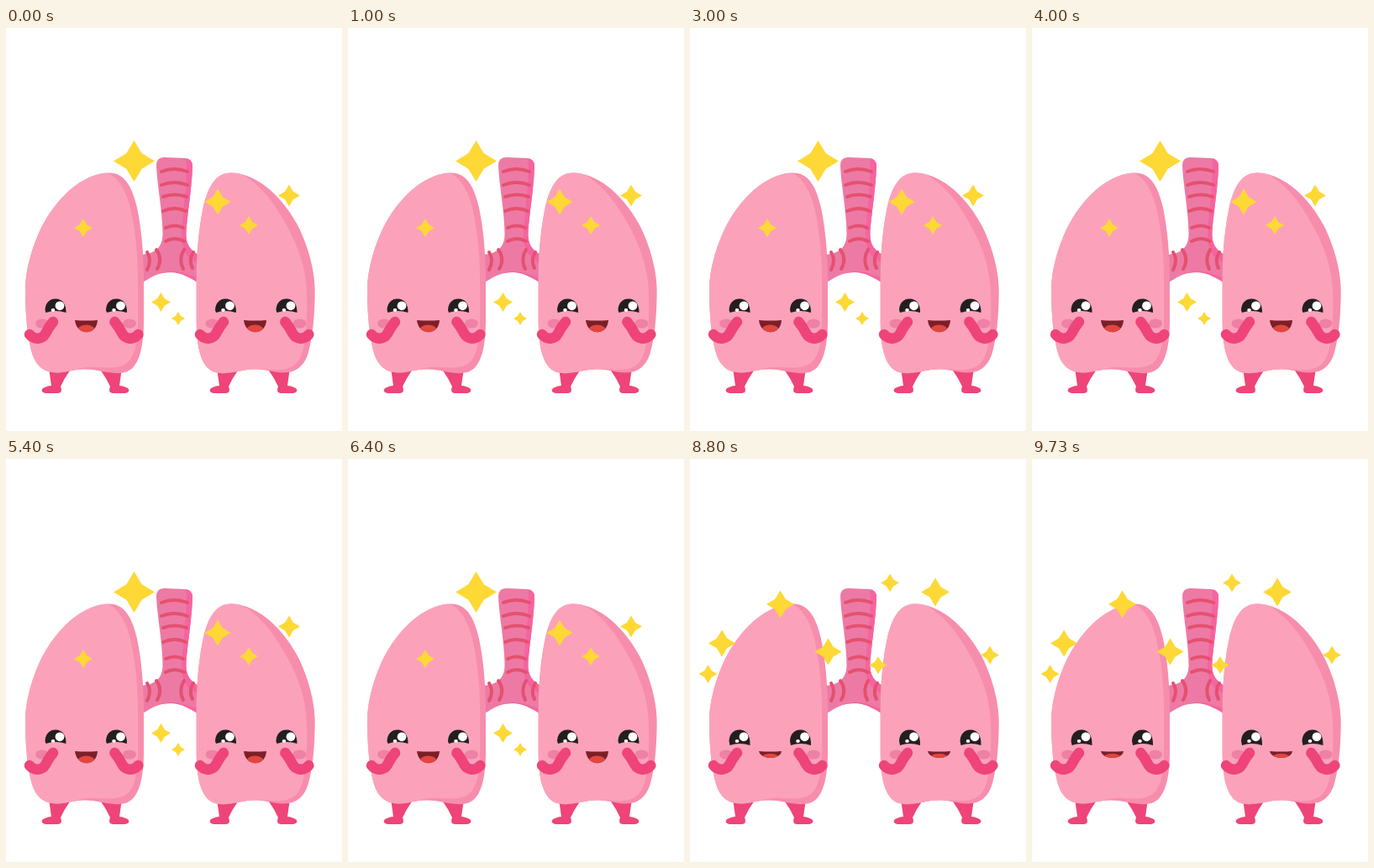
Write an HTML page with a canvas that moves like this. It is 400x480 px and loops after 9.99 s.

```html
<!DOCTYPE html>
<html lang="en">
<head>
<meta charset="utf-8">
<title>Happy lungs</title>
<style>
  html, body { margin: 0; width: 100%; height: 100%; overflow: hidden; background: #fff; }
  canvas { display: block; width: 400px; height: 480px; }
</style>
</head>
<body>
<canvas id="stage"></canvas>
<script>
const canvas = document.getElementById('stage');
const ctx = canvas.getContext('2d');
const ratio = window.devicePixelRatio || 1;
canvas.width = 400 * ratio;
canvas.height = 480 * ratio;

const LOOP = 9990, BEAT = 1000, SWITCH = 530;
const COLOR = {
  lung: '#fba2ba', lungShade: '#f78dac', limb: '#ee4479', cheek: '#ee81a5',
  tube: '#ec7aa5', tubeShade: '#f5649f', ring: '#e5506f',
  star: '#fed835', eye: '#231f20', mouth: '#7b1f29', tongue: '#e2463f'
};

// Each star: centre x, centre y, radius
const STARS_OPEN = [
  [152.5, 158.5, 24.5], [252, 207, 15.5], [337, 199.5, 13], [289, 235, 11],
  [92, 238, 11], [184.5, 326.5, 11.5], [205, 346, 8]
];
const STARS_CLOSED = [
  [107.5, 173, 16.5], [38, 219.5, 16], [21.5, 256, 11], [164.5, 229.5, 16],
  [238, 147.5, 11], [292, 158.5, 17], [357, 233.5, 11], [224, 245.5, 10.5]
];

const lungPath = new Path2D(`M123 172.5 C140 172.5 150 187 156 214 C161 238 164 268 164 300
  L164 350 C164 375 160 393 153 402 C148 409 140 412 129 411
  C116 410 108 406.5 94 406.5 C80 406.5 74 410 61 410.5
  C45 411 36 402 31.5 389 C26 371 23 345 23 312 C23 286 33 255 44 234
  C66 194 97 172.5 123 172.5 Z`);
const innerLight = new Path2D(`M113 170 C131 173 142 190 148 214 C154 240 157 270 157 300
  L157 350 C157 374 153 390 145 398 C137 405 125 405 108 404 C94 403 84 406 73 412
  L20 415 L10 300 L30 160 Z`);
const outerLight = new Path2D(`M260 165 C285 173 304 188 322 215 C340 243 357 275 358 316
  C359 350 357 380 350 393 C344 405 332 408 318 407 C304 406 297 406 288 407
  L278 415 L220 415 L220 165 Z`);
const tubePath = new Path2D(`M179 164 Q179 154 188 154 L213 155 Q223 156 222 166
  C221 192 216 222 214.5 242 C213.5 257 219 266 232 271 L232 305
  C219 298 210 291 196 291 C181 291 172 297 160 305 L160 270
  C178 269 187 261 186.5 244 C186 216 180 188 179 164 Z`);
const tubeSide = new Path2D(`M214 150 C217 180 210 220 209 245 C209 264 215 277 235 281
  L235 312 L218 298 C205 290 190 291 180 294 C199 285 212 292 226 297
  L230 268 L226 150 Z`);
const tubeRings = new Path2D(`M185 171 Q200 165 216 171 M185 187 Q200 181 216 187
  M187 201 Q201 196 215 201 M187 218 Q201 212 214 218
  M190 238 Q201 233 211 238 M190 254 Q201 248 212 254
  M168 267 Q174 277 168 288 M179 264 Q187 275 180 287
  M212 264 Q205 275 211 287 M223 267 Q217 276 222 286`);
const legPath = new Path2D(`M51 405 L76 408 Q69 418 65 427 Q68 434 62 435 L47 435
  Q40 433 44 429 Q50 426 54 426 Z`);
const armPath = new Path2D('M28 365 C34 372 43 371 47 364 Q51 356 56 350');

const rightLung = new Path2D();
rightLung.addPath(lungPath, new DOMMatrix([-1, 0, 0, 1, 390.7, 0]));

function fill(path, color) {
  ctx.fillStyle = color;
  ctx.fill(path);
}

function oval(x, y, rx, ry, color) {
  ctx.fillStyle = color;
  ctx.beginPath();
  ctx.ellipse(x, y, rx, ry, 0, 0, Math.PI * 2);
  ctx.fill();
}

// Draws a part for the left lung and again, moved across, for the right
function both(dx, draw) {
  draw();
  ctx.save();
  ctx.translate(dx, 0);
  draw();
  ctx.restore();
}

// Draws a part and its reflection about a vertical axis
function mirrored(axis, draw) {
  draw();
  ctx.save();
  ctx.translate(axis * 2, 0);
  ctx.scale(-1, 1);
  draw();
  ctx.restore();
}

function drawShaded(outline, color, part, partColor) {
  ctx.save();
  fill(outline, color);
  ctx.clip(outline);
  fill(part, partColor);
  ctx.restore();
}

function drawTube() {
  drawShaded(tubePath, COLOR.tube, tubeSide, COLOR.tubeShade);
  ctx.strokeStyle = COLOR.ring;
  ctx.lineWidth = 4;
  ctx.lineCap = 'round';
  ctx.stroke(tubeRings);
}

function drawLegs() {
  mirrored(94.5, () => fill(legPath, COLOR.limb));
}

function drawArms() {
  ctx.strokeStyle = COLOR.limb;
  ctx.lineWidth = 12.5;
  ctx.lineCap = 'round';
  mirrored(92.7, () => ctx.stroke(armPath));
}

function drawEye(x, low) {
  ctx.fillStyle = COLOR.eye;
  ctx.beginPath();
  ctx.moveTo(x - 12.5, 336);
  ctx.bezierCurveTo(x - 12, 327, x - 7, 322.5, x, 322.5);
  ctx.bezierCurveTo(x + 8, 322.5, x + 13, 329, x + 12.5, low);
  ctx.quadraticCurveTo(x, low - 4, x - 11.5, low);
  ctx.closePath();
  ctx.fill();
  oval(x + 5, 330.8, 5.4, 5.4, '#fff');
  oval(x - 3, 336, 2.3, 2, '#fff');
}

function drawEyes(open) {
  const low = open ? 339 : 341;
  oval(43, 352, 8, 5.5, COLOR.cheek);
  oval(147, 352, 8, 5.5, COLOR.cheek);
  drawEye(59, low);
  drawEye(131.5, low);
}

function drawMouth(open) {
  const low = 348 + (open ? 19 : 10.5);
  const mouth = new Path2D(`M82 348 Q95.5 349 109 348 C108 ${low} 84 ${low} 82 348 Z`);
  const tongue = new Path2D();
  tongue.ellipse(95.5, open ? 361 : 356, 11, open ? 7.5 : 5, 0, 0, Math.PI * 2);
  drawShaded(mouth, COLOR.mouth, tongue, COLOR.tongue);
}

function drawStar([x, y, r]) {
  const waist = r * 0.53;
  ctx.fillStyle = COLOR.star;
  ctx.beginPath();
  for (let i = 0; i < 8; i++) {
    const a = i * Math.PI / 4, d = i % 2 ? waist : r;
    ctx.lineTo(x + Math.cos(a) * d, y + Math.sin(a) * d);
  }
  ctx.fill();
}

function draw(time) {
  const open = (time % LOOP) % BEAT < SWITCH;
  ctx.setTransform(ratio, 0, 0, ratio, 0, 0);
  ctx.fillStyle = '#fff';
  ctx.fillRect(0, 0, 400, 480);

  drawTube();
  both(200, drawLegs);
  drawShaded(lungPath, COLOR.lungShade, innerLight, COLOR.lung);
  drawShaded(rightLung, COLOR.lungShade, outerLight, COLOR.lung);
  both(202.5, () => drawEyes(open));
  both(201, () => drawMouth(open));
  both(203, drawArms);
  (open ? STARS_OPEN : STARS_CLOSED).forEach(drawStar);
}

const start = performance.now();
function tick() {
  draw(performance.now() - start);
  requestAnimationFrame(tick);
}
tick();
</script>
</body>
</html>
```
